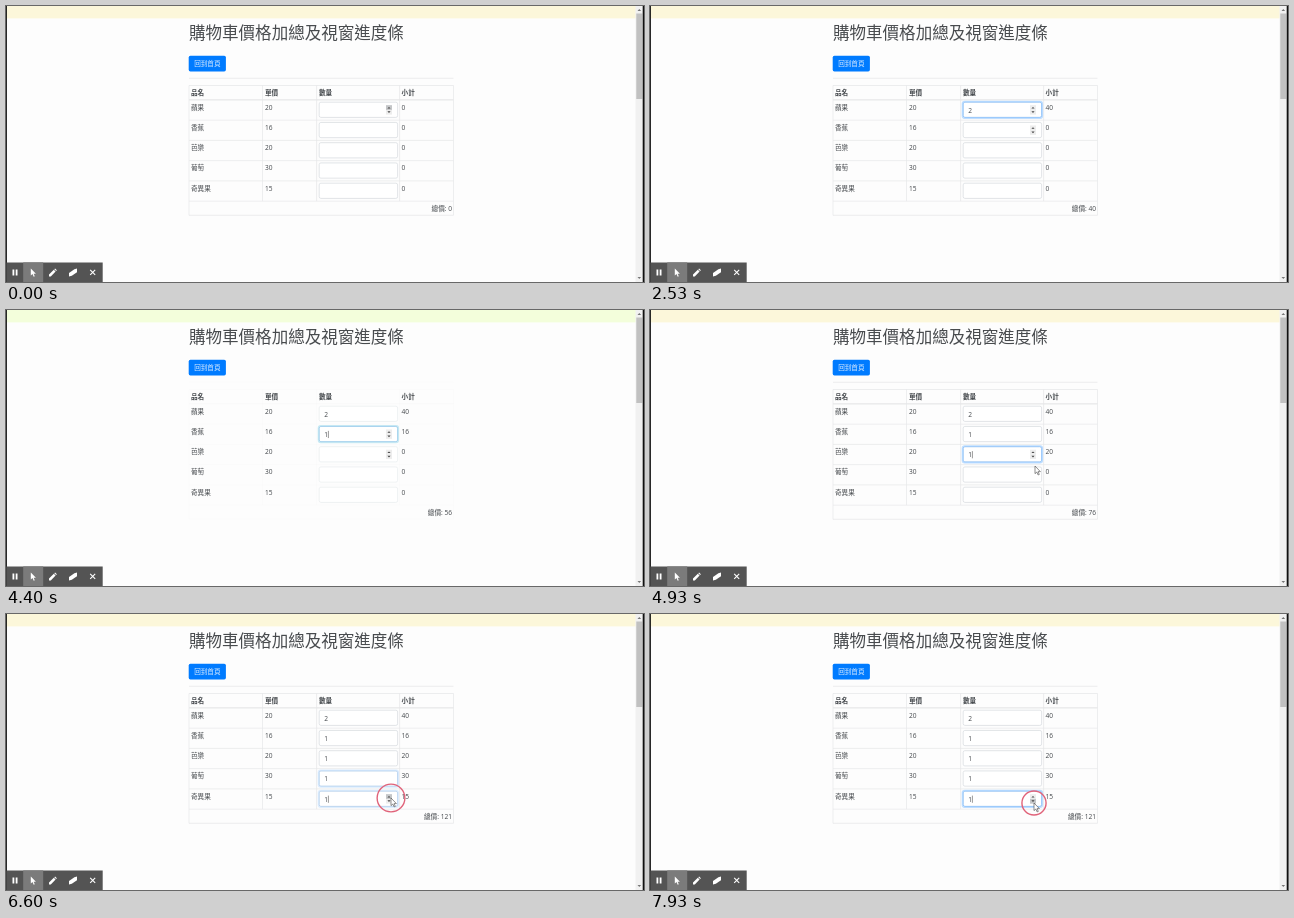
Recreate the animation shown at these times as an HTML page. Size 638 px wide and 276 px high, loop 8 s.

```html
<!DOCTYPE html>
<html lang="zh-Hant">
<head>
<meta charset="utf-8">
<title>購物車</title>
<style>
html, body { margin: 0; width: 100%; height: 100%; overflow: hidden; background: #fdfdfd; }
svg { display: block; width: 100vw; height: 100vh; }
text { font: 6.6px "Open Sans", "Noto Sans CJK TC", "Noto Sans CJK", sans-serif; fill: #43474b; }
.title { font-size: 16.54px; font-weight: 300; fill: #484b4e; }
.head { font-weight: 700; }
.line { stroke: #e5e7e9; stroke-width: .7; fill: none; }
.box { fill: #fff; stroke: #d6dade; stroke-width: .7; }
.glow { fill: none; stroke: #bfdeff; stroke-width: 1.4; }
.glow .edge { stroke: #80bdff; stroke-width: .7; }
.caret { stroke: #555; stroke-width: .6; }
.pale .line { opacity: .15; }
.pale .box { stroke: #e9ecee; }
.pale .glow { stroke: #c9eaf3; }
.pale .edge { stroke: #8cc6ec; }
</style>
</head>
<body>
<svg id="stage" viewBox="0 0 638 276">
  <rect id="banner" width="638" height="12.4"/>
  <text class="title" x="183" y="32.8">購物車價格加總及視窗進度條</text>
  <rect x="182.7" y="49.8" width="37.2" height="15.7" rx="1.7" fill="#007bff"/>
  <text x="188.2" y="60.3" style="fill:#e4f1ff">回到首頁</text>
  <path class="line" d="M183 72.3H447.5"/>
  <g id="table"></g>
  <text id="total" x="446" y="204.6" text-anchor="end"></text>

  <path fill="#f1f1f1" d="M629.5 0h7.5v276h-7.5z"/>
  <path fill="#c1c1c1" d="M630.3 7.5h6v85.5h-6z"/>
  <path fill="#777" d="M631.5 5l1.8-2 1.8 2zM631.5 271l1.8 2 1.8-2z"/>
  <path fill="#111" d="M0 0h.9v276H0zM636.7 0h1.3v276h-1.3z"/>

  <path fill="#545454" d="M.4 256.4h96.3v19.6H.4z"/>
  <path fill="#7b7b7b" d="M17.2 256.4h20v19.6h-20z"/>
  <g fill="#fff">
    <path d="M6.5 263.4h1.8v6H6.5zM9.7 263.4h1.8v6H9.7z"/>
    <path d="M24.8 262.6v7l1.7-1.5 1.2 2.7 1.1-.5-1.2-2.6h2.3z"/>
    <path d="M43 270.4v-1.8l4.8-4.8 1.8 1.8-4.8 4.8zM48.3 263.3l.8-.8 1.8 1.8-.8.8z"/>
    <path d="M63 267l5.4-3.8 2.6-.6v3.6l-5.2 3.6-2.8.8z"/>
  </g>
  <path stroke="#fff" stroke-width="1.1" d="M84.2 263.8l5 5m0-5l-5 5"/>

  <circle id="ripple" fill="none" stroke="#e0637a" stroke-width="1.4"/>
  <path id="cursor" d="M0 0v7.6l1.8-1.6 1.3 2.9 1.2-.5-1.3-2.8h2.4z" fill="#fff" stroke="#444" stroke-width=".6"/>
</svg>
<script>
const LOOP = 8000, PITCH = 20.25, FADE = 150, RIPPLE = 270;
const $ = id => document.getElementById(id);
const show = (el, on) => el.setAttribute('visibility', on ? 'inherit' : 'hidden');
const label = (x, y, s, cls = '') => `<text x="${x}" y="${y}" class="${cls}">${s}</text>`;

const goods = [['蘋果', 20], ['香蕉', 16], ['芭樂', 20], ['葡萄', 30], ['奇異果', 15]];
// time, row, new quantity
const clicks = [[530, 0, 1], [1600, 0, 2], [2930, 1, 1], [4460, 2, 1],
                [5460, 3, 1], [6530, 4, 1], [7060, 4, 2], [7800, 4, 1]];
const hovers = [0, 2130, 3930, 5200, 5860];
const cursorShown = [[530, 2130], [2730, 3930], [4460, 5200], [5460, 5860], [6400, LOOP]];
// time, x, y of the pointer tip
const path = [[0, 385.5, 101.5], [2130, 385.5, 101.5], [2200, 385, 122], [3930, 385, 122],
              [4060, 385, 142], [4730, 385, 142], [4930, 385, 156], [5060, 385, 162],
              [5730, 385, 162], [5860, 385, 184], [7330, 385, 184], [7460, 384, 189], [LOOP, 384, 189]];

let html = '<path class="line" d="M183 79.5H447.5V209.3H183zM183 93.6H447.5M183 94.1H447.5' +
  'M256.5 79.5V195.2M310.6 79.5V195.2M393.6 79.5V195.2';
for (let i = 1; i <= 5; i++) html += `M183 ${93.9 + i * PITCH}H447.5`;
html += '"/>';
['品名', '單價', '數量', '小計'].forEach((s, i) => html += label([185, 259, 313, 395.6][i], 88.9, s, 'head'));
goods.forEach(([name, price], i) => {
  html += `<g class="row" transform="translate(0 ${i * PITCH})">
    ${label(185, 103.6, name)}${label(259, 103.6, price)}${label(395.6, 103.6, 0, 'sum')}
    <rect class="box" x="313.2" y="96.2" width="78.4" height="15.2" rx="1.7"/>
    <g class="glow">
      <rect x="312.4" y="95.4" width="80" height="16.8" rx="2.2"/>
      <rect class="edge" x="313.2" y="96.2" width="78.4" height="15.2" rx="1.7"/>
    </g>
    ${label(318.3, 106.5, '', 'qty')}
    <path class="caret" d="M322.4 100.6v7.2"/>
    <g class="spin">
      <path fill="#ededed" d="M380 99.2h6v9.4h-6z"/>
      <path class="hot" fill="#c4c6c8" d="M380 99.2h6v4.7h-6z"/>
      <path fill="#444" d="M381.4 102.6l1.6-1.7 1.6 1.7zM381.4 105.3l1.6 1.7 1.6-1.7z"/>
    </g></g>`;
});
$('table').innerHTML = html;
const rows = [...document.querySelectorAll('.row')].map(el => {
  const part = c => el.querySelector('.' + c);
  return { sum: part('sum'), qty: part('qty'), glow: part('glow'),
           caret: part('caret'), spin: part('spin'), hot: part('hot') };
});

function pointer(t) {
  const k = path.findIndex(p => p[0] > t);
  const [t0, x0, y0] = path[k - 1], [t1, x1, y1] = path[k];
  const f = (t - t0) / (t1 - t0);
  return [x0 + (x1 - x0) * f, y0 + (y1 - y0) * f];
}

// 0 to 1 after the first click in a row
function fade(t, row) {
  const first = clicks.find(c => c[1] === row);
  return first ? Math.max(0, Math.min(1, (t - first[0]) / FADE)) : 0;
}

function draw(t) {
  const done = clicks.filter(c => c[0] <= t);
  const last = done[done.length - 1];
  const age = last ? t - last[0] : Infinity;
  const hover = hovers.filter(h => h <= t).length - 1;
  const visible = cursorShown.some(([a, b]) => t >= a && t < b);
  const [x, y] = pointer(t);
  const counts = goods.map(() => 0);
  done.forEach(([, row, n]) => counts[row] = n);

  let total = 0;
  rows.forEach((r, i) => {
    const sum = counts[i] * goods[i][1], focused = !!last && last[1] === i;
    const dy = y - 103.9 - i * PITCH;
    total += sum;
    r.sum.textContent = sum;
    r.qty.textContent = counts[i] || '';
    r.glow.setAttribute('opacity', fade(t, i) - fade(t, i + 1));
    show(r.caret, focused && age % 1060 < 530);
    show(r.spin, focused || i === hover);
    show(r.hot, i === hover && Math.abs(dy) < 8 && (visible || t < 530));
    r.hot.setAttribute('transform', `translate(0 ${dy > 0 ? 4.7 : 0})`);
  });
  $('total').textContent = '總價: ' + total;

  // brief washed-out refresh of the page
  const pale = t >= 4400 && t < 4460;
  $('stage').classList.toggle('pale', pale);
  $('banner').setAttribute('fill', pale ? '#f3fedb' : '#fcf7da');

  const cursor = $('cursor'), ripple = $('ripple');
  show(cursor, visible);
  cursor.setAttribute('transform', `translate(${x} ${y})`);
  show(ripple, age < RIPPLE);
  if (age < RIPPLE) {
    ripple.setAttribute('cx', x);
    ripple.setAttribute('cy', y);
    ripple.setAttribute('r', 16 - age * .03);
    ripple.setAttribute('opacity', Math.min(1, (RIPPLE - age) / 90));
  }
}

const start = performance.now();
function frame() {
  draw((performance.now() - start) % LOOP);
  requestAnimationFrame(frame);
}
frame();
</script>
</body>
</html>
```
